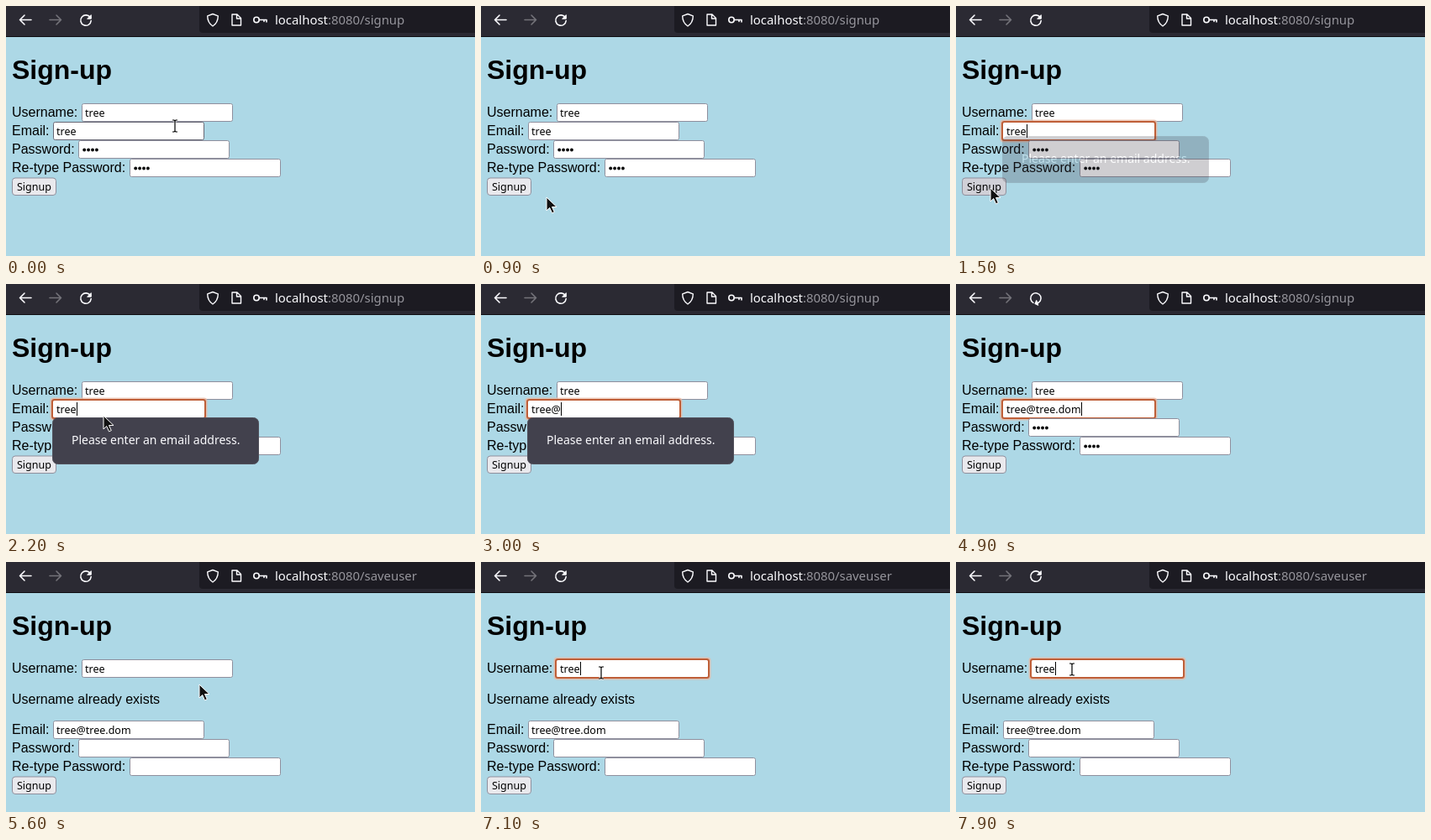
Write an HTML page that moves like this. It is 558 px wide and 298 px high and loops after 8000 ms.

```html
<!DOCTYPE html>
<html lang="en">
<head>
<meta charset="utf-8">
<title>Sign-up</title>
<style>
  html, body { margin: 0; width: 100%; height: 100%; overflow: hidden; background: #add8e6; }
  svg { display: block; width: 558px; height: 298px; }
  text { font: 16px "Liberation Sans", Arial, sans-serif; white-space: pre; }
  .ui { font-family: "Noto Sans", "Open Sans", sans-serif; font-size: 12.5px; }
  .url { font-size: 14.9px; }
  .tip { font-size: 14px; }
  .list { font-size: 13.75px; }
  h1, .title { font-size: 32px; font-weight: bold; }
  .icon { fill: none; stroke: #fbfbfe; stroke-width: 1.6; stroke-linecap: round; stroke-linejoin: round; }
</style>
</head>
<body>
<svg id="stage" viewBox="0 0 558 298"></svg>
<script>
const stage = document.getElementById('stage');
const LOOP = 8000, STEP = 100;
const USER = 'tree', MAIL = 'tree@tree.dom';

// Pointer path: [step, x, y], straight lines between
const path = [
  [0, 201, 143], [1, 199, 141], [2, 196, 143], [4, 196, 143], [7, 140, 190], [9, 78, 228],
  [12, 41, 217], [15, 41, 217], [22, 116, 157], [26, 230, 146], [63, 230, 146],
  [64, 137, 130], [66, 137, 130], [68, 143, 132], [73, 143, 132], [79, 138, 128]
];
// Steps at which one more letter of the address is typed
const keys = [30, 34, 35, 36, 37, 41, 42, 43, 45];

function pointerAt(n) {
  const i = path.findIndex(p => p[0] >= n);
  if (i < 1) return path[0].slice(1);
  const a = path[i - 1], b = path[i], k = (n - a[0]) / (b[0] - a[0]);
  return [1, 2].map(j => Math.round(a[j] + (b[j] - a[j]) * k));
}

const text = (x, y, s, cls = '', fill = '#000') =>
  `<text x="${x}" y="${y}" class="${cls}" fill="${fill}">${s}</text>`;
const rect = (x, y, w, h, r, fill, more = '') =>
  `<rect x="${x}" y="${y}" width="${w}" height="${h}" rx="${r}" fill="${fill}" ${more}/>`;

function toolbar(n, page) {
  const spin = n == 48 ? 50 : n == 49 ? 115 : 0;
  const dim = n >= 50 && n < 56 ? 0.4 : 1;
  return rect(0, 0, 558, 37, 0, '#2b2a33') + rect(0, 36, 558, 1, 0, '#0f0e13') +
    rect(230, -6, 340, 38, 4, '#1c1b22') +
    `<g class="icon">
      <path d="M30 16.5H16.5M22 11l-5.5 5.5 5.5 5.5"/>
      <path d="M52 16.5H65.5M60 11l5.5 5.5-5.5 5.5" opacity=".35"/>
      <g transform="rotate(${spin} 95 17)" opacity="${dim}">
        <path d="M100.4 14A6.2 6.2 0 1 0 101.2 17.5"/>
        <path d="M101.3 11v4.2H97z" fill="#fbfbfe" stroke-width="1"/>
      </g>
      <path d="M246 9.5l6.3 2.3c0 5.5-1.8 9.3-6.3 12.2-4.5-2.900-6.300-6.700-6.300-12.200z" stroke-width="1.4"/>
      <path d="M269 10h6l4.500 4.500V23H269zM274.500 10v5h5" stroke-width="1.400"/>
      <circle cx="298" cy="16.500" r="3.200"/><path d="M301.500 16.500H310V19M307 16.500v2"/>
    </g>` +
    `<text x="320" y="22" class="ui url" fill="#fbfbfe">localhost<tspan fill="#96959c">:8080/${page}</tspan></text>`;
}

function field(f, focused, hover) {
  const { x, y, value } = f;
  let s = '';
  if (focused) {
    s += rect(x - 3.5, y - 2.5, 187, 27, 4, '#e9b9a3', 'opacity=".75"') +
      rect(x - 1, y, 182, 22, 2.5, '#fff', 'stroke="#bf5f38" stroke-width="2"');
  } else {
    s += rect(x + .5, y + .5, 179, 21, 2, '#fff', `stroke="${hover ? '#676774' : '#8f8f9d'}"`);
  }
  if (f.dots) {
    for (let i = 0; i < f.dots; i++) s += `<circle cx="${x + 7.2 + i * 4.9}" cy="${y + 11.5}" r="1.9"/>`;
  } else {
    s += text(x + 4, y + 16, value, focused ? 'ui focused' : 'ui');
  }
  return s;
}

function tooltip(n) {
  const shift = n == 15 ? -4 : n == 16 ? -1 : 0;
  const alpha = n == 15 ? .25 : n == 16 ? .85 : 1;
  return `<g transform="translate(0 ${shift})" opacity="${alpha}">` +
    rect(55.5, 159.5, 245, 55, 6, '#42414d', 'stroke="#52515c"') +
    text(78, 191, 'Please enter an email address.', 'ui tip', '#fbfbfe') + '</g>';
}

const suggestions = () => rect(55.5, 159.5, 179, 49, 6, '#333', 'stroke="#242424"') +
  text(62, 180, MAIL, 'ui list', '#fbfbfe') +
  text(62, 200, 'tree@tambril.dom', 'ui list', '#fbfbfe');

const beamPath = 'M-3-7h2l1 1 1-1h2M-3 7h2l1-1 1 1h2M0-6V6';
const arrowPath = 'M0 0V16l3.700-3.500 2.800 6.300 2.800-1.200-2.800-6.100H12z';

function pointer(x, y, beam) {
  return `<g transform="translate(${x} ${y})">` + (beam
    ? `<path d="${beamPath}" fill="none" stroke="#fff" stroke-width="3" opacity=".7"/>
       <path d="${beamPath}" fill="none" stroke="#000" stroke-width="1.2"/>`
    : `<path d="${arrowPath}" fill="#111" stroke="#fff"/>`) + '</g>';
}

function draw(n) {
  const saved = n >= 50;
  const drop = saved ? 51 : 0;
  const typed = MAIL.slice(0, 4 + keys.filter(k => k <= n).length);
  const dots = saved ? 0 : 4;
  const fields = [
    { label: 'Username:', x: 90, y: 116, value: USER },
    { label: 'Email:', x: 56, y: 138 + drop, value: typed },
    { label: 'Password:', x: 86, y: 160 + drop, value: '', dots },
    { label: 'Re-type Password:', x: 147, y: 182 + drop, value: '', dots }
  ];
  const focus = saved ? (n >= 71 ? 0 : -1) : n >= 15 ? 1 : -1;
  const tip = n >= 15 && n < 34;
  const list = n >= 34 && n < 38;
  const [px, py] = pointerAt(n);
  const shown = n < 30 || saved;
  const over = shown && !(tip && py > 155)
    ? fields.findIndex(f => px >= f.x && px < f.x + 180 && py >= f.y && py < f.y + 22) : -1;
  const onButton = shown && px < 60 && py > 204 + drop && py < 226 + drop;
  const buttonFill = n == 14 ? '#b1b1b9' : onButton ? '#d0d0d7' : '#e9e9ed';

  let s = rect(0, 0, 558, 298, 0, '#add8e6') + toolbar(n, saved ? 'saveuser' : 'signup') +
    text(7, 87, 'Sign-up', 'title');
  fields.forEach((f, i) => {
    s += text(7, f.y + 16, f.label) + field(f, i == focus, i == over);
  });
  if (saved) s += text(7, 169, 'Username already exists');
  s += rect(7.5, 205 + drop, 52, 20.5, 3.5, buttonFill, 'stroke="#8f8f9d"') +
    text(13, 220 + drop, 'Signup', 'ui') + '<path id="caret" stroke="#000"/>';
  if (tip) s += tooltip(n);
  if (list) s += suggestions();
  if (shown) s += pointer(px, py, over >= 0);
  stage.innerHTML = s;

  if (focus >= 0) {
    const f = fields[focus];
    const width = stage.querySelector('.focused').getComputedTextLength();
    document.getElementById('caret').setAttribute('d',
      `M${Math.round(f.x + 4 + width) + .5} ${f.y + 3}v16`);
  }
}

const start = performance.now();
let last = -1;
function tick() {
  const n = Math.floor((performance.now() - start) % LOOP / STEP);
  if (n != last) draw(last = n);
  requestAnimationFrame(tick);
}
tick();
</script>
</body>
</html>
```
